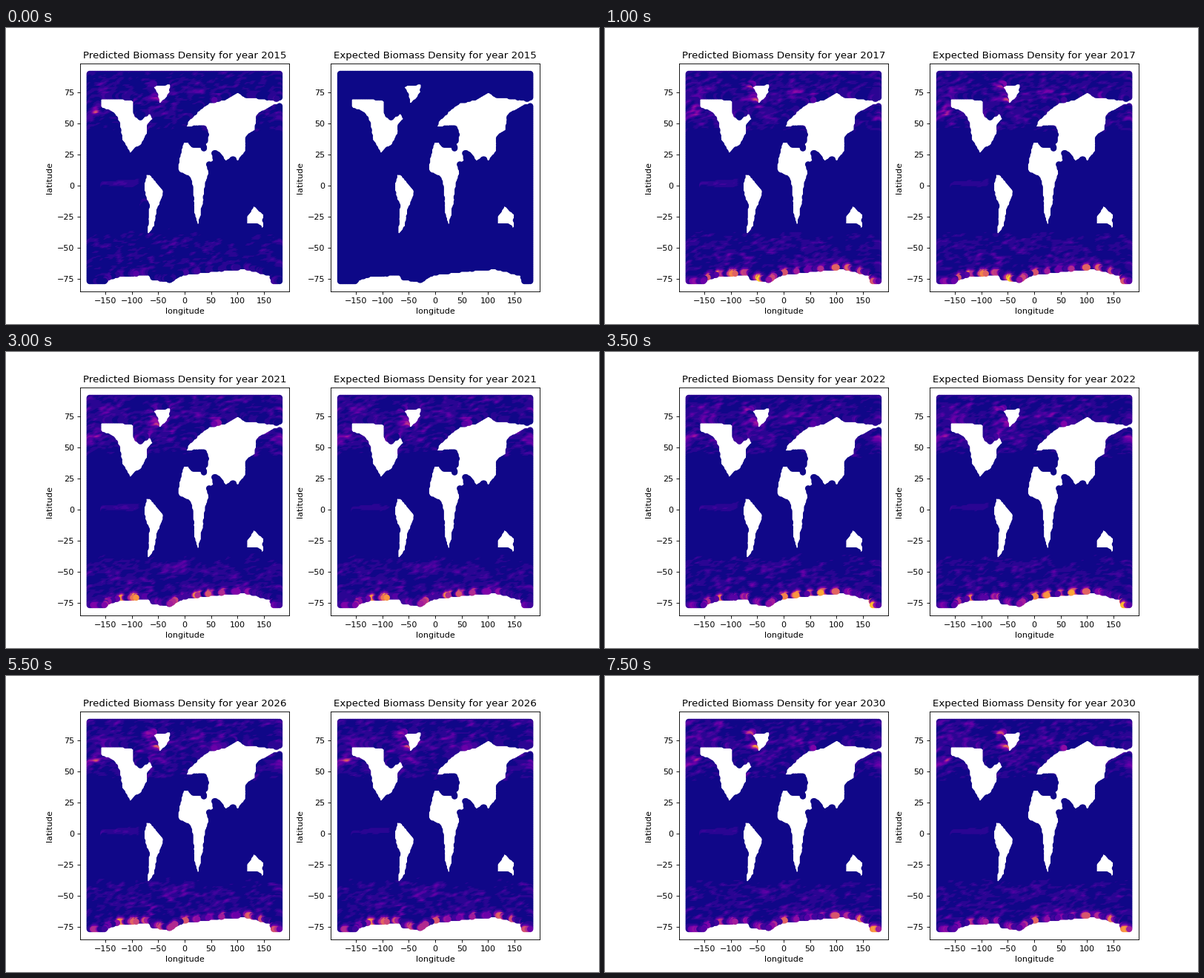
A matplotlib script for the animation above (8 s loop, 800 by 400 pixels).

```python
import numpy as np
import matplotlib.pyplot as plt
from matplotlib.animation import FuncAnimation
from matplotlib.path import Path

plt.rcParams["font.family"] = "DejaVu Sans"

START, YEARS = 2015, 16
XLIM, YLIM = (-197.45, 197.45), (-85.35, 98.35)
DOT = 7.5  # marker diameter in points
LEVELS = 20

# Key points of the coastlines, in pixels of the left panel
LAND = [
    # North America, Greenland
    [(129, 97), (170, 98), (171, 117), (182, 129), (189, 120), (194, 117),
     (197, 123), (188, 130), (190, 140), (181, 158), (174, 160), (168, 168),
     (157, 149), (154, 126), (145, 112), (129, 107)],
    [(200, 80), (221, 77), (220, 87), (208, 101), (205, 88)],
    # Eurasia, Arabia
    [(244, 133), (247, 126), (264, 110), (274, 103), (297, 98), (313, 88),
     (320, 94), (369, 100), (338, 115), (335, 137), (323, 145), (322, 166),
     (312, 179), (307, 168), (297, 179), (291, 170), (273, 155), (274, 142),
     (270, 130)],
    [(270, 157), (276, 181), (279, 178), (274, 161)],
    # Africa, South America, Australia
    [(240, 156), (246, 155), (250, 162), (263, 163), (273, 197), (268, 210),
     (265, 235), (259, 265), (255, 250), (253, 215), (249, 200), (234, 194),
     (233, 184)],
    [(190, 199), (194, 199), (212, 221), (203, 246), (199, 268), (192, 277),
     (194, 240), (187, 219)],
    [(335, 242), (346, 252), (346, 270), (341, 263), (326, 264), (326, 255)],
    # Antarctica
    [(134, 352), (139, 341), (158, 337), (192, 335), (196, 341), (222, 345),
     (238, 335), (285, 330), (322, 327), (356, 336), (356, 352)],
]

# Waters that bloom: lon, lat, strength
SPOTS = [(66, 68, .32), (-52, 69, .26), (-64, 48, .24), (-166, 57, .2),
         (138, 43, .15), (-66, 79, .3), (-62, -64, .2), (-77, -13, .1)]

lon = np.arange(-179.5, 180, 2)
lon[-1] = 179.5
lat = np.arange(90, -78, -1.0)
LON, LAT = np.meshgrid(lon, lat)
SHAPE = LON.shape


def to_pixels(x, y):
    px = 100 + (x - XLIM[0]) * (620 / 2.2) / (XLIM[1] - XLIM[0])
    py = 48 + (YLIM[1] - y) * 308 / (YLIM[1] - YLIM[0])
    return np.column_stack([px.ravel(), py.ravel()])


def near(pts, poly, reach):
    """True where a point lies in the polygon or within reach of its edge."""
    poly = np.array(poly, float)
    hit = Path(poly).contains_points(pts)
    for a, b in zip(poly, np.roll(poly, -1, axis=0)):
        d = b - a
        t = np.clip((pts - a) @ d / (d @ d), 0, 1)
        hit |= np.hypot(*(pts - a - t[:, None] * d).T) < reach
    return hit


def find_sea():
    pts = to_pixels(LON, LAT)
    rough = np.random.default_rng(5).uniform(-0.5, 0.6, len(pts))
    reach = DOT * 80 / 72 / 2 + rough
    land = np.any([near(pts, poly, reach) for poly in LAND], axis=0)
    return ~land.reshape(SHAPE)


def inland(mask, n=2):
    """Cells of the mask at least n cells away from its border."""
    for _ in range(n):
        p = np.pad(mask, 1)
        mask = mask & p[2:, 1:-1] & p[:-2, 1:-1] & p[1:-1, 2:] & p[1:-1, :-2]
    return mask


def streaks(seed, sx=1.7, sy=0.8, tilt=-0.3):
    """Smoothed noise, drawn out along the latitude, with unit deviation."""
    white = np.random.default_rng(seed).standard_normal(SHAPE)
    fy = np.fft.fftfreq(SHAPE[0])[:, None]
    fx = np.fft.fftfreq(SHAPE[1])[None, :]
    blur = np.exp(-20 * ((sx * fx) ** 2 + (sy * fy + tilt * sx * fx) ** 2))
    n = np.fft.ifft2(np.fft.fft2(white) * blur).real
    return n / n.std()


def sigmoid(x):
    return 1 / (1 + np.exp(-x))


def blob(x, y, amp):
    return amp * np.exp(-((LON - x) / 8) ** 2 - ((LAT - y) / 3.5) ** 2)


sea = find_sea()
open_sea = inland(sea)
polar = 0.08 * sigmoid((LAT - 45) / 3) + 0.066 * sigmoid((-40 - LAT) / 3)
span = (LON + 155) / 70
tongue = ((span > 0) & (span < 1)) * np.exp(
    -((LAT + 0.3) / (1.5 + 3 * np.clip(span, 0, 1))) ** 2)
live = sea & ((LAT > 34) | (LAT < -28) | (tongue > 0.1) | ~open_sea
              | (sum(blob(*s) for s in SPOTS) > 0.02))

lasting = 0.6 * streaks(1) + 0.4 * streaks(2, 6, 3)
last = SHAPE[0] - 1 - np.argmax(sea[::-1], axis=0)
shelf = np.exp(-np.clip(last - np.arange(SHAPE[0])[:, None], 0, 99) / 1.5)
shelf *= LAT < -60


def ice_edge(rng):
    """Clusters of strong bloom along the southern ice."""
    row = np.full(len(lon), 0.12)
    for x in np.linspace(-168, 172, 15):
        amp = rng.uniform(0.2, 0.9)
        row = np.maximum(row, amp * np.exp(-((lon - x) / 8) ** 4))
    grain = np.repeat(rng.uniform(0.35, 1.1, len(lon) // 3 + 1), 3)[:len(lon)]
    return shelf * row * grain


def density(year, expected):
    if expected and year == START:
        return np.zeros(SHAPE)
    rng = np.random.default_rng(year)
    first = year == START
    n = lasting + 0.7 * streaks(year)
    if expected:
        n = 0.92 * n + 0.3 * streaks(year + 100)
    field = polar * (0.75 + 0.5 * n + 0.6 * np.maximum(n - 1.1, 0))
    spots = sum(blob(x, y, a * rng.uniform(0.4, 1.5)) for x, y, a in SPOTS)
    field += spots * np.clip(0.6 + 0.5 * n, 0.1, 1.8)
    field *= 0.75 if first else 1
    field += (0.08 if expected else 0.1) * tongue * (1 + 0.15 * n)
    field = np.maximum(field, ice_edge(rng) * (0.2 if first else 1))
    field[0] = 0.07
    return np.clip(field, 0, 1)


fig, axes = plt.subplots(1, 2, figsize=(10, 5), dpi=80)
cmap = plt.get_cmap("plasma")
fills, dots = [], []
for ax in axes:
    fills += ax.plot(LON[open_sea], LAT[open_sea], "o", ms=DOT, mew=0)
    dots.append(ax.scatter(LON[live], LAT[live], s=DOT ** 2, lw=0, zorder=3,
                           c=np.zeros(live.sum()), cmap=cmap, vmin=0, vmax=1))
    ax.set(xlim=XLIM, ylim=YLIM, xlabel="longitude", ylabel="latitude",
           xticks=range(-150, 151, 50), yticks=range(-75, 76, 25))


def draw(i):
    year = START + i
    floor = 0.005 if i else 0
    for k, kind in enumerate(("Predicted", "Expected")):
        field = np.floor(density(year, k == 1) * LEVELS) / LEVELS
        dots[k].set_array(np.maximum(field, floor)[live])
        fills[k].set_color(cmap(floor))
        axes[k].set_title(f"{kind} Biomass Density for year {year}")
    return dots


anim = FuncAnimation(fig, draw, frames=YEARS, interval=500, repeat=True,
                     repeat_delay=0, blit=False)
plt.show()
```
